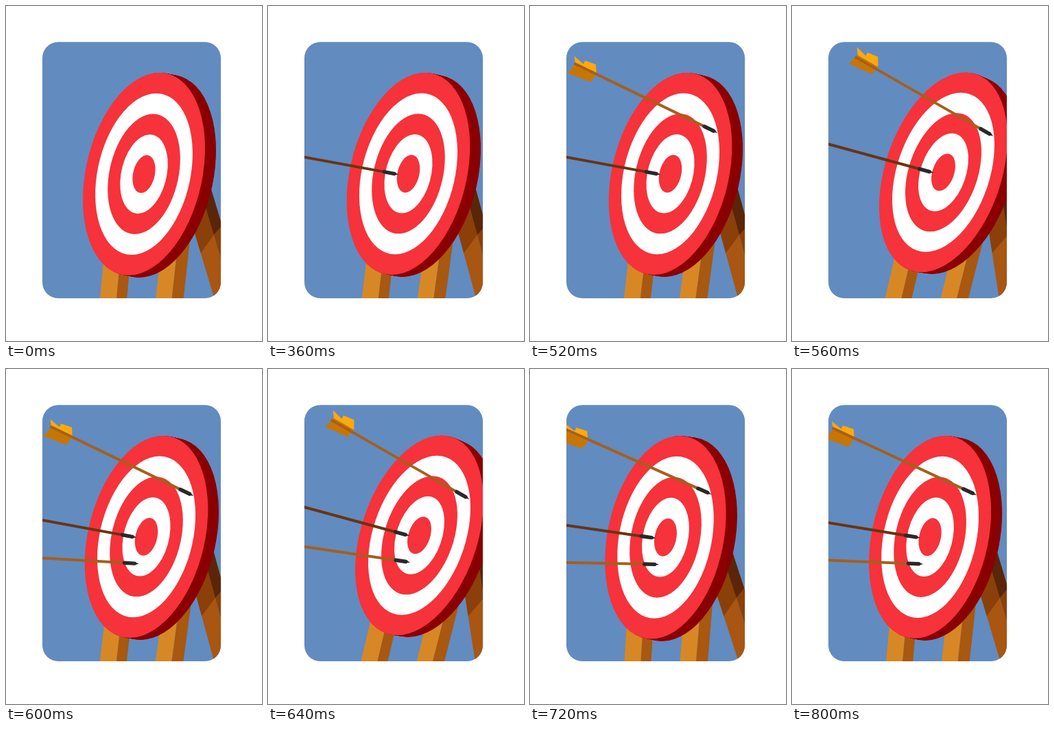
Recreate the animation shown at these times as an HTML page with a canvas. Size 373 by 486 pixels, loop 4 s.

```html
<!DOCTYPE html>
<html lang="en">
<head>
<meta charset="utf-8">
<title>Arrows on target</title>
<style>
html, body { margin: 0; width: 100%; height: 100%; overflow: hidden; background: #fff; }
canvas { display: block; }
</style>
</head>
<body>
<canvas id="stage" width="373" height="486"></canvas>
<script>
const ctx = document.getElementById('stage').getContext('2d');
const LOOP = 4000, STEP = 40, FLOOR = 426;
const RED = '#f6323a', WHITE = '#fff', SIDE = '#8a0002', IRON = '#2a2829';
const OAK = '#d78825', OAK_SIDE = '#a8580f', BACK = '#a85612', BACK_SIDE = '#8b4009', SHADE = '#5b2508';

const ARROWS = [
  { hit: 360, x: 187, y: 245, slope: 0.164, color: '#693411' },
  { hit: 520, x: 269, y: 183, slope: 0.463, color: '#a65f1b', feathers: true },
  { hit: 600, x: 191, y: 283, slope: 0.04, color: '#a65f1b' }
];

// Damped swing that peaks one step after the latest hit
function swing(t) {
  const last = ARROWS.filter(a => t >= a.hit).pop();
  if (!last) return 0;
  const s = Math.min(Math.floor((t - last.hit) / STEP) - 1, 4);
  return 19.5 * Math.exp(-0.7 * Math.abs(s)) * Math.cos(1.2 * s);
}

function poly(color, pts) {
  ctx.fillStyle = color;
  ctx.beginPath();
  pts.forEach(([x, y]) => ctx.lineTo(x, y));
  ctx.closePath();
  ctx.fill();
}

// Slanted plank: x and w are measured at the floor, yl and yr end its two edges
function plank(push, color, x, w, slope, yl = FLOOR, yr = FLOOR) {
  const at = (x0, y) => {
    const up = FLOOR - y;
    return [x0 + slope * up + push * (0.0075 * up - 0.1), y];
  };
  poly(color, [at(x, 260), at(x + w, 260), at(x + w, yr), at(x, yl)]);
}

function legs(push) {
  plank(push, BACK, 304, 27, -0.3);
  plank(push, BACK_SIDE, 331, 16, -0.3);
  plank(push, BACK_SIDE, 304, 27, -0.3, 358.5, 332);
  plank(push, SHADE, 331, 16, -0.3, 332, 318);
  plank(push, OAK, 137, 24, 0.09);
  plank(push, OAK_SIDE, 161, 15, 0.09);
  plank(push, OAK, 218, 23.5, 0.11);
  plank(push, OAK_SIDE, 241.5, 17, 0.11);
}

function disc(push, scale, color, dx = 0, dy = 0) {
  const w = 89 + push * 0.23, h = 147 - push * 0.1, tilt = 22.5 + push * 0.5;
  const flat = Math.sqrt(w * w - tilt * tilt);
  ctx.save();
  ctx.transform(flat * scale, 0, -tilt * scale, h * scale, 201 + push + dx, 243.8 - push * 0.13 + dy);
  ctx.beginPath();
  ctx.arc(0, 0, 1, 0, Math.PI * 2);
  ctx.restore();
  ctx.fillStyle = color;
  ctx.fill();
}

function board(push) {
  for (let i = 16; i > 0; i--) {
    disc(push, 1 - i * push * 5e-5, SIDE, i, i * (0.19 + push * 0.005));
  }
  for (let ring = 0; ring < 5; ring++) {
    disc(push, 1 - ring * 0.2033, ring % 2 ? WHITE : RED);
  }
}

function line(color, width, from, to, cap) {
  ctx.strokeStyle = color;
  ctx.lineWidth = width;
  ctx.lineCap = cap;
  ctx.beginPath();
  ctx.moveTo(from, 0);
  ctx.lineTo(to, 0);
  ctx.stroke();
}

// The tip sits at the origin and the shaft runs to the left
function arrow({ x, y, slope, color, feathers }, push) {
  ctx.save();
  ctx.translate(x + push * (1 + (244 - y) * 0.0042), y + push * (x - 215) * 0.0055);
  ctx.rotate(Math.atan(slope + 0.0055 * push));
  if (feathers) {
    ctx.save();
    ctx.translate(0, -0.26 * push);
    poly('#c67606', [[-230, 1], [-196, 1], [-199, 15], [-235, 18]]);
    poly('#ffa90a', [[-230, 1], [-236.5, -8.5], [-219.5, -4], [-219.5, -9.5], [-203, -11.5], [-196, 1]]);
    ctx.restore();
  }
  line(color, 4, feathers ? -232 : -260, -20, 'butt');
  line(IRON, 5.4, -21.5, -6.5, 'round');
  poly(IRON, [[-7, -2.2], [0, 0], [-7, 2.2]]);
  ctx.restore();
}

function draw(t) {
  const push = swing(t);
  ctx.fillStyle = WHITE;
  ctx.fillRect(0, 0, 373, 486);
  ctx.save();
  ctx.beginPath();
  ctx.roundRect(53, 52.3, 260, 371.7, 23);
  ctx.clip();
  ctx.fillStyle = '#628bc0';
  ctx.fillRect(50, 50, 266, 378);
  legs(push);
  board(push);
  ARROWS.filter(a => t >= a.hit).forEach(a => arrow(a, push));
  ctx.restore();
}

let begin;
function tick(now) {
  if (begin === undefined) begin = now;
  draw((now - begin) % LOOP);
  requestAnimationFrame(tick);
}
draw(0);
requestAnimationFrame(tick);
</script>
</body>
</html>
```
